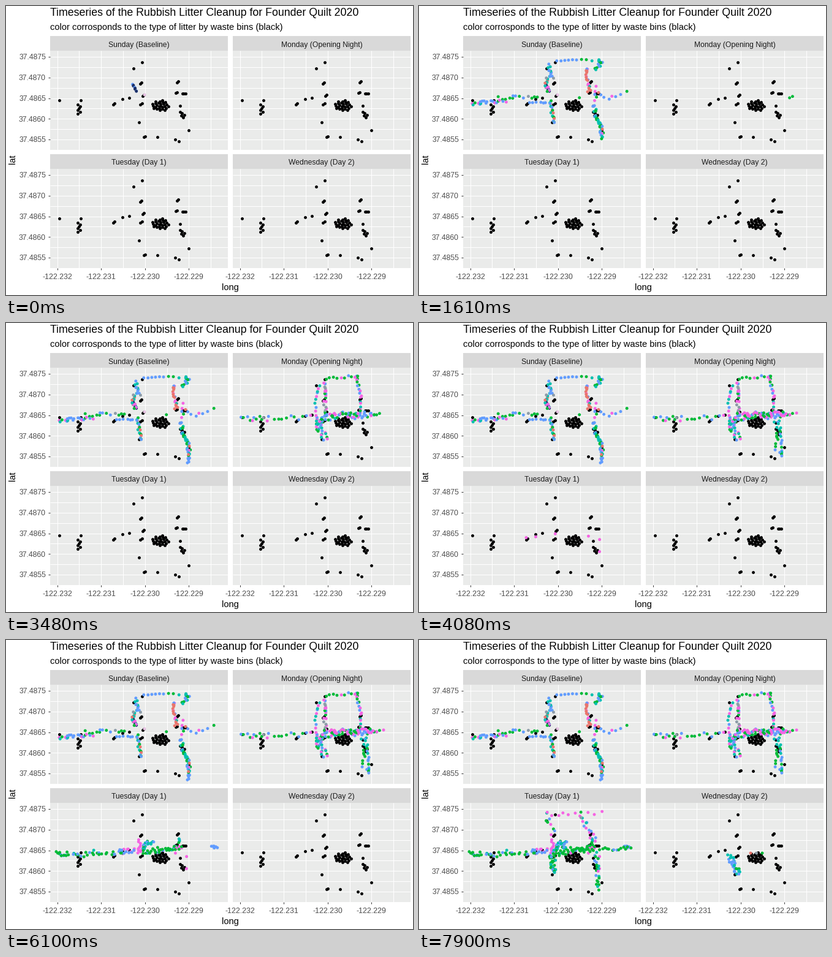
Animation, 664 px wide and 472 px high, one loop 8000 ms. Source, as a matplotlib script:

```python
import numpy as np
import matplotlib.pyplot as plt
from matplotlib.animation import FuncAnimation
from matplotlib.patches import Rectangle

W, H, DPI = 664, 472, 64
PX = 72 / DPI
LOOP, INTERVAL = 8000, 40
DX, DY = 298, 193          # offset between facet panels
COLORS = dict(g="#00BA38", t="#00C0AF", b="#619CFF", p="#F564E3", s="#E9756C",
              n="#1C2F66", l="#E8C4E4", y="#8D9CA8")
MIXED = "gggtttbbbppsy"

plt.rcParams["font.family"] = "Liberation Sans"
rng = np.random.default_rng(20)

fig = plt.figure(figsize=(W / DPI, H / DPI), dpi=DPI, facecolor="white")
ax = fig.add_axes([0, 0, 1, 1])
ax.set(xlim=(0, W), ylim=(H, 0))
ax.axis("off")


def text(x, y, s, size, color="black", ha="left", **kw):
    kw.setdefault("va", "baseline")
    ax.text(x, y, s, fontsize=size * PX, color=color, ha=ha, **kw)


def box(x, y, w, h, color):
    ax.add_patch(Rectangle((x, y), w, h, facecolor=color, linewidth=0))


def line(x0, y0, x1, y1, color):
    ax.plot([x0, x1], [y0, y1], color=color, linewidth=PX,
            solid_capstyle="butt")


def dots(points, color, zorder):
    return ax.scatter(*np.transpose(points), s=(4.9 * PX) ** 2, c=color,
                      linewidths=0, zorder=zorder)


def waste_bins():
    """Bin positions in the top left panel."""
    lone = [(87, 154), (121.5, 153.5), (190, 151.5), (200.5, 149.5),
            (207.5, 102), (221.5, 91.5), (216.5, 189.5), (246.5, 214),
            (275.5, 217.5), (281.5, 220.5), (297.5, 202.5), (283.5, 162.5)]
    pairs = [(176, 160), (220, 126), (224, 146), (220.5, 160), (226, 213.5),
             (280, 124), (278, 141.5)]
    twins = [(x + d, y - d / 2) for x, y in pairs for d in (-1.2, 1.2)]
    west = [(119 - 2.5 * np.cos(2.4 * k), 161 + 3 * k) for k in range(6)]
    gate = [(287.5 + 2.5 * k, 143) for k in range(3)]
    east = [(284 + 1.7 * k, 173 + 5 * (k % 2) + 1.2 * k) for k in range(5)]
    k = np.arange(26)
    r, a = 2.8 * np.sqrt(k), 2.4 * k
    hub = np.column_stack([252 + r * np.cos(a), 162.5 + 0.65 * r * np.sin(a)])
    return np.vstack([lone, twins, west, gate, east, hub])


FACETS = ["Sunday (Baseline)", "Monday (Opening Night)",
          "Tuesday (Day 1)", "Wednesday (Day 2)"]
LONG = [(83.5 + 71.6 * i, f"-122.{232 - i}") for i in range(4)]
LAT = [(82.9 + 33.8 * i, f"37.{4875 - 5 * i}") for i in range(5)]
BINS = waste_bins()

for i, name in enumerate(FACETS):
    ox, oy = DX * (i % 2), DY * (i // 2)
    box(72 + ox, 49 + oy, 290, 24, "#D9D9D9")
    box(72 + ox, 73 + oy, 290, 162, "#EAEBEA")
    text(217 + ox, 66.5 + oy, name, 12.15, "#1A1A1A", "center")
    for x, label in LONG:
        for gx in (x, x + 35.8):
            line(gx + ox, 73 + oy, gx + ox, 235 + oy, "white")
        if oy:
            line(x + ox, 428, x + ox, 431, "#333333")
            text(x + ox, 445.5, label, 12.4, "#4D4D4D", "center")
    for y, label in LAT:
        for gy in (y, y + 16.9):
            if gy < 234:
                line(72 + ox, gy + oy, 362 + ox, gy + oy, "white")
        if not ox:
            line(69, y + oy, 72, y + oy, "#333333")
            text(65, y + oy + 4.3, label, 12.3, "#4D4D4D", "right")
    dots(BINS + (ox, oy), "black", 4)

text(72, 16, "Timeseries of the Rubbish Litter Cleanup for Founder Quilt 2020", 17.75)
text(72, 39, "color corrosponds to the type of litter by waste bins (black)", 14.6)
text(366, 464, "long", 14.6, ha="center")
text(11, 250.5, "lat", 14.6, ha="center", va="center", rotation=90)

born, place, shade = [], [], []


def walk(start, end, n, path, palette=MIXED, spread=(3, 3)):
    """Find n pieces of litter one after another along a path."""
    path = np.array(path, float)
    u = np.linspace(0, len(path) - 1, n)
    knots = np.arange(len(path))
    for k in range(n):
        spot = [np.interp(u[k], knots, axis) for axis in path.T]
        place.append(spot + rng.uniform(-1, 1, 2) * spread)
        born.append(start + (end - start) * (k + 1) / n)
        shade.append(COLORS[rng.choice(list(palette))])


# Sunday
walk(0, 0, 8, [(207, 128), (213, 140)], "nnnb", (1, 1))
walk(0, 0, 1, [(226, 145)], "l", (0, 0))
walk(0, 370, 26, [(212, 140), (207, 124), (217, 114), (211, 97)], MIXED, (4, 4))
walk(170, 370, 20, [(87, 160), (112, 156), (140, 156)], "ggbbbtp")
walk(270, 470, 13, [(132, 150), (160, 149), (192, 150)], "gggby")
walk(370, 570, 7, [(182, 157), (212, 159)], "b", (2, 1))
walk(370, 600, 18, [(214, 155), (217, 175), (221, 190)], "ttggbss", (2, 2))
walk(470, 720, 9, [(225, 90), (250, 87), (282, 89)], "ggbbt", (1, 1))
walk(620, 810, 13, [(295, 89), (297, 93), (286, 106)], "ggtb", (3, 2))
walk(670, 870, 18, [(273, 101), (274, 120), (280, 139)], "ppssbt", (2, 2))
walk(870, 1070, 7, [(264, 149), (290, 133), (294, 148), (312, 149)], "gbps")
walk(1070, 1270, 8, [(289, 140), (287, 160), (290, 186)], "bgtp")
walk(1210, 1270, 4, [(340, 140), (309, 151)], "gbby", (1.5, 1.5))
walk(1410, 1470, 16, [(286, 165), (293, 187), (296, 205)], "gggbbt")
walk(1470, 1670, 18, [(295, 190), (300, 212), (297, 226)], "ggbbtps")

# Monday
walk(1570, 1670, 5, [(610, 148), (590, 152)], "gbt", (1, 2))
walk(1670, 1870, 9, [(579, 152), (556, 153)], "bbp", (2, 4))
walk(1870, 2210, 32, [(583, 150), (550, 149), (530, 154), (509, 158)],
     "ggbbbtp", (2, 4))
walk(2010, 2410, 32, [(513, 156), (510, 168), (520, 190)], "gggtttbp", (6, 2))
walk(2410, 2810, 19, [(521, 150), (520, 120), (519, 98)], "pppttbyg", (2.5, 2))
walk(2510, 2810, 9, [(506, 145), (505, 120), (513, 102)], "ttppb", (2, 2))
walk(2610, 2880, 14, [(520, 150), (575, 150)], "ppgb", (2, 5))
walk(2880, 3180, 23, [(384, 157), (430, 156), (505, 153)], "gggggbbpy", (2, 4))
walk(3080, 3280, 10, [(522, 90), (550, 88), (574, 88)], "gggbp", (1, 2))
walk(3180, 3480, 16, [(573, 87), (577, 112), (580, 145)], "pptbbg", (2.5, 2))
walk(3280, 3480, 7, [(582, 147), (602, 151)], "bbpg")
walk(3480, 3880, 26, [(582, 158), (587, 180), (587, 198), (587, 217)],
     "gggttbb", (6, 2))
walk(3680, 4020, 24, [(598, 150), (560, 150), (517, 152)], "pppg", (3, 5))
walk(3820, 3880, 2, [(616, 147), (605, 150)], "p", (0, 0))

# Tuesday
walk(4020, 4080, 6, [(172, 348), (204, 346), (291, 346), (295, 372)], "p")
walk(4080, 4280, 14, [(285, 324), (275, 341), (226, 347)], "gggtb")
walk(4280, 4720, 26, [(226, 348), (262, 343), (289, 338)], "ggggpb")
walk(4420, 4820, 12, [(224, 342), (187, 345)], "ppb", (2, 3))
walk(4520, 4820, 6, [(217, 325), (218, 344)], "p", (2, 2))
walk(4720, 5020, 6, [(335, 338), (344, 338)], "b", (1, 2))
walk(5020, 5290, 13, [(91, 349), (125, 350), (153, 345)], "gggbt", (3, 4))
walk(5300, 5490, 10, [(173, 347), (215, 344)], "gbbp", (2, 4))
walk(5630, 5690, 2, [(268, 342), (275, 338)], "g", (1, 1))
walk(5730, 6030, 22, [(84, 344), (97, 353), (150, 350), (190, 347)],
     "gggbb", (3, 4))
walk(5830, 6100, 22, [(223, 342), (229, 331), (238, 332), (236, 341)],
     "ttttgb", (3, 3))
walk(5930, 6130, 10, [(226, 343), (285, 337)], "g")
walk(6130, 6330, 8, [(209, 285), (213, 300), (219, 318)], "bbptg", (4, 3))
walk(6230, 6430, 10, [(208, 284), (250, 284), (297, 282)], "pppg", (2, 3))
walk(6330, 6530, 15, [(266, 288), (274, 305), (286, 328)], "ppbbyt", (4, 3))
walk(6430, 6630, 14, [(294, 341), (320, 342), (345, 338)], "gggb", (2, 3))
walk(6630, 7100, 28, [(217, 346), (219, 365), (220, 380)], "ggggttbbp", (5, 3))
walk(6900, 7400, 22, [(288, 348), (290, 375), (294, 407)], "gggbbpt", (4, 2))
walk(7300, 7690, 10, [(222, 350), (250, 346), (285, 342)], "gggp")

# Wednesday
walk(7630, 7760, 3, [(541, 348), (560, 348)], "ygs", (0, 0))
walk(7650, 7900, 30, [(508, 353), (514, 366), (520, 384)], "bbbttg", (5, 3))

order = np.argsort(born, kind="stable")
born, place, shade = (np.array(a)[order] for a in (born, place, shade))

# Moments at which the picture refreshes
RUNS = [(70, 7), (2010, 9), (2880, 9), (4420, 9), (5830, 9), (6700, 9)]
PAIRS = [810, 1010, 1210, 1410, 1610, 1810, 3820, 4020, 4220, 5430, 5630, 7630]
steps = np.array(sorted(
    [t + 100 * k for t, n in RUNS for k in range(n)]
    + [t + d for t in PAIRS for d in (0, 60)] + [0, 5290, 7830, 7900]))

litter = dots(place, shade, 5)


def update(frame):
    now = frame * INTERVAL + 30
    shown = steps[steps <= now][-1]
    count = np.searchsorted(born, shown, side="right")
    litter.set_offsets(place[:count])
    litter.set_facecolors(shade[:count])
    return [litter]


anim = FuncAnimation(fig, update, frames=LOOP // INTERVAL, interval=INTERVAL,
                     repeat=True, repeat_delay=0)
plt.show()
```
